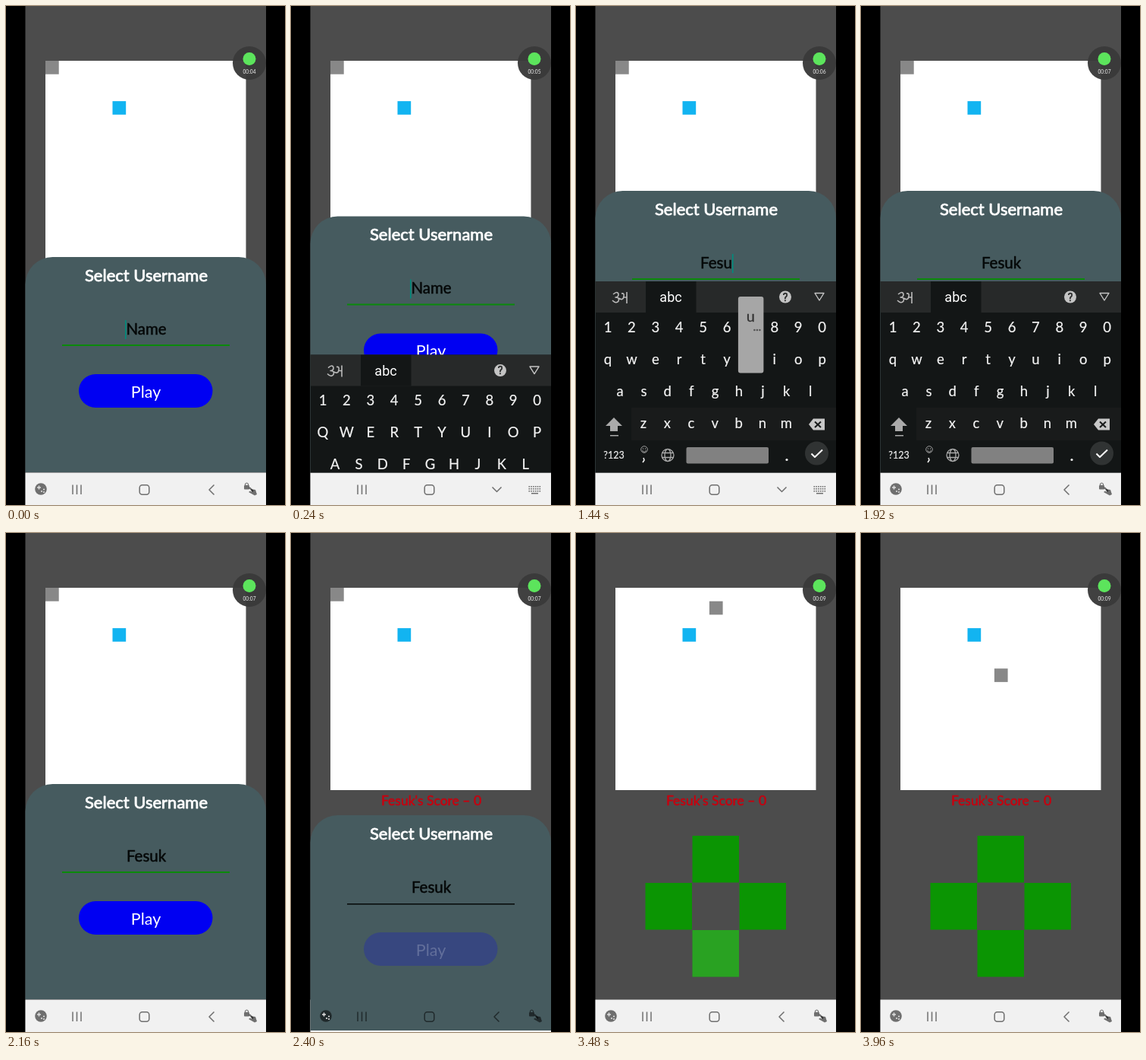
An HTML page with a canvas for the animation above (4080 ms loop, 368 px wide and 656 px high).

```html
<!DOCTYPE html>
<html lang="en">
<head>
<meta charset="utf-8">
<style>
html, body { margin: 0; width: 100%; height: 100%; overflow: hidden; background: #000; }
canvas { display: block; }
</style>
</head>
<body>
<canvas id="stage" width="368" height="656"></canvas>
<script>
const ctx = document.getElementById("stage").getContext("2d");
const LOOP = 4080, STEP = 120;
const CELL = 17.7, BOARD = { x: 52, y: 72, w: 264.5, h: 266 };
const PLAYER = "Fesuk";
const PRESSES = [800, 980, 1160, 1380, 1620];
const KEY_GAP = 31.4;
const ROWS = [
  { keys: "1234567890", x: 42, y: 422 },
  { keys: "qwertyuiop", x: 42, y: 464 },
  { keys: "asdfghjkl", x: 58, y: 506 },
  { keys: "zxcvbnm", x: 89, y: 548 }
];

const clamp = v => Math.max(0, Math.min(1, v));
const easeOut = v => 1 - (1 - clamp(v)) ** 3;

function rect(x, y, w, h, color) {
  ctx.fillStyle = color;
  ctx.fillRect(x, y, w, h);
}

function roundRect(x, y, w, h, r, color) {
  ctx.beginPath();
  ctx.roundRect(x, y, w, h, r);
  ctx.fillStyle = color;
  ctx.fill();
}

function circle(x, y, r, color) {
  ctx.beginPath();
  ctx.arc(x, y, r, 0, Math.PI * 2);
  ctx.fillStyle = color;
  ctx.fill();
}

function line(points, color, width = 1.5, close = false) {
  ctx.beginPath();
  points.forEach(([x, y], i) => i ? ctx.lineTo(x, y) : ctx.moveTo(x, y));
  if (close) ctx.closePath();
  ctx.strokeStyle = color;
  ctx.lineWidth = width;
  ctx.stroke();
}

function polygon(points, color) {
  ctx.beginPath();
  points.forEach(([x, y]) => ctx.lineTo(x, y));
  ctx.fillStyle = color;
  ctx.fill();
}

function strokePath(d, color, width) {
  ctx.strokeStyle = color;
  ctx.lineWidth = width;
  ctx.stroke(new Path2D(d));
}

function text(str, x, y, size, color, weight = 0, family = "Lato") {
  ctx.font = `${size}px ${family}, sans-serif`;
  ctx.textAlign = "center";
  ctx.fillStyle = color;
  ctx.fillText(str, x, y);
  if (weight) {
    ctx.strokeStyle = color;
    ctx.lineWidth = weight;
    ctx.strokeText(str, x, y);
  }
}

function snakeCell(t) {
  if (t <= 3120) return [Math.max(0, Math.min(5, Math.floor((t - 2400) / STEP))), 0];
  const moved = Math.floor((t - 3120) / STEP * 1.15);
  return [5 + Math.min(2, moved), Math.max(0, moved - 2)];
}

function drawCell(col, row, color) {
  rect(BOARD.x + col * CELL, BOARD.y + row * CELL, 17.7, 17.7, color);
}

function drawGame(t) {
  rect(0, 0, 368, 656, "#000");
  rect(25.5, 0, 317.5, 656, "#4c4c4c");
  rect(BOARD.x, BOARD.y, BOARD.w, BOARD.h, "#fff");
  drawCell(5, 3, "#12b4f1");
  drawCell(...snakeCell(t), "#888");
  text(`${PLAYER}'s Score – 0`, 185, 358, 17.5, "#c8000f", 0.5);
  for (const [x, y] of [[153, 398], [91, 460], [215, 460], [153, 522]])
    rect(x + 0.5, y, 61.5, 61.5, "#0b9503");
  if (t >= 3300 && t < 3500) rect(153.5, 522, 61.5, 61.5, "rgba(255,255,255,.12)");
}

function drawBubble(t) {
  circle(321, 75, 22, "rgba(58,58,58,.96)");
  circle(321, 69.5, 8.5, "#5ce45c");
  text("00:0" + (4 + Math.floor((t + 700) / 820)), 321, 88.5, 6.7, "#eee");
}

function drawPanel(t, lift, slide, typed) {
  const dy = slide - 87 * lift;
  roundRect(25.5, 330 + dy, 317.5, 283 + slide - dy, [36, 36, 0, 0], "#465b5f");
  text("Select Username", 185, 362 + dy, 22, "#fff", 0.8);

  const value = PLAYER.slice(0, typed);
  text(value || "Name", 185, 432 + dy, 20.5, "#050808", 0.5);
  if (t < 1800) {
    const half = ctx.measureText(value).width / 2;
    rect(typed ? 185 + half : 157, 413 + dy, 1.6, 25, "#008c7c");
  }
  if (t < 2200) rect(74, 445 + dy, 221, 2, "#0b8a0b");
  else rect(74, 446 + dy, 221, 1.6, "#080c0c");

  ctx.globalAlpha = t < 2280 ? 1 : t < 2400 ? 0.6 : 0.22;
  roundRect(96, 484 + dy, 176.5, 44, 22, "#0000f2");
  text("Play", 184.5, 515 + dy, 21.5, "#fff");
  ctx.globalAlpha = 1;
}

function drawToolbar() {
  rect(25.5, 362, 317.5, 41, "#272929");
  rect(92, 362, 66.5, 41, "#131616");
  strokePath("M49 379Q55 374 56 379Q56 383 52 383Q58 383 56 388Q53 392 48 387M56 384Q62 388 63 382Q64 377 60 378M63 383H67M67 376V391", "#bbb", 1.6);
  text("abc", 125, 389, 18, "#fff", 0, "Roboto");
  circle(276, 382.5, 8, "#c4c4c4");
  text("?", 276, 387.5, 14, "#272929", 0.6, "Roboto");
  line([[315, 377.5], [327, 377.5], [321, 387]], "#c4c4c4", 1.4, true);
}

function drawBottomKeys() {
  text("?123", 50, 595, 12.5, "#eee", 0.2);
  line([[89, 594], [90, 597], [88, 600]], "#eee", 1.6);
  ctx.beginPath();
  ctx.arc(90, 583, 4.3, 0, 7);
  ctx.moveTo(92.3, 584);
  ctx.arc(90, 584, 2.3, 0, Math.PI);
  ctx.strokeStyle = "#aaa";
  ctx.lineWidth = 0.9;
  ctx.stroke();
  circle(88.5, 582, 0.7, "#aaa");
  circle(91.5, 582, 0.7, "#aaa");

  ctx.beginPath();
  ctx.arc(121, 590.5, 8, 0, 7);
  ctx.moveTo(125, 590.5);
  ctx.ellipse(121, 590.5, 4, 8, 0, 0, 7);
  for (const y of [587.5, 593.5]) {
    ctx.moveTo(113.5, y);
    ctx.lineTo(128.5, y);
  }
  ctx.strokeStyle = "#aaa";
  ctx.lineWidth = 1.3;
  ctx.stroke();

  roundRect(145.5, 580, 108.5, 21.5, 2, "#818181");
  circle(278, 596.5, 1.6, "#eee");
  circle(317.5, 588, 15.5, "#303333");
  line([[310.5, 588.5], [315, 593], [325, 583.5]], "#fff", 2);
}

function drawPopup(letter, upper) {
  const row = ROWS.find(r => r.keys.includes(letter));
  const x = row.x + row.keys.indexOf(letter) * KEY_GAP;
  roundRect(x - 16.5, row.y - 82, 33.5, 100.5, 3, "#a6a6a6");
  text(upper ? letter.toUpperCase() : letter, x, row.y - 49, 20, "#333", 0.3);
  for (const dx of [5, 8.5, 12]) circle(x + dx, row.y - 38, 1.3, "#555");
}

function drawKeyboard(t, lift, typed) {
  if (lift <= 0) return;
  const upper = typed === 0;
  ctx.save();
  ctx.beginPath();
  ctx.rect(25.5, 0, 317.5, 613.5);
  ctx.clip();
  ctx.translate(0, 251 * (1 - lift));
  rect(25.5, 362, 317.5, 252, "#131616");
  rect(73, 528, 270, 43, "#191b1b");
  drawToolbar();
  for (const row of ROWS)
    [...row.keys].forEach((key, i) =>
      text(upper ? key.toUpperCase() : key, row.x + i * KEY_GAP, row.y + 6.5, 18.5, "#f4f4f4", 0.2));

  const shift = upper ? "#fff" : "#aaa";
  polygon([[50, 541], [61, 552], [55, 552], [55, 559], [45, 559], [45, 552], [39, 552]], shift);
  rect(45, 564, 11, 1.5, shift);
  polygon([[307, 550], [313, 542.5], [328, 542.5], [328, 557.5], [313, 557.5]], "#c8c8c8");
  line([[315, 546.5], [323, 554]], "#191b1b", 2);
  line([[323, 546.5], [315, 554]], "#191b1b", 2);
  drawBottomKeys();

  const pressed = PRESSES.findIndex(p => t >= p && t < p + 130);
  if (pressed >= 0) drawPopup(PLAYER[pressed].toLowerCase(), pressed === 0);
  ctx.restore();
}

function drawNavIcons(typing) {
  const ink = "rgba(0,0,0,.54)";
  for (const x of [88, 93.5, 99]) line([[x, 629.5], [x, 642]], ink, 1.5);
  ctx.beginPath();
  ctx.roundRect(176.2, 629.7, 12.6, 12.6, 3.5);
  ctx.strokeStyle = ink;
  ctx.lineWidth = 1.5;
  ctx.stroke();

  if (typing) {
    line([[265.5, 632.5], [271.5, 638.5], [277.5, 632.5]], ink);
    for (let row = 0; row < 3; row++)
      for (let col = 0; col < 6; col++)
        rect(313.5 + col * 2.8, 631 + row * 3, 1.6, 1.6, ink);
    rect(317, 640, 9, 1.5, ink);
    return;
  }
  line([[274.5, 629.5], [268, 636], [274.5, 642.5]], ink);
  circle(46, 635, 7.8, ink);
  line([[41, 633], [46, 633]], "#ddd", 1.5);
  line([[43.5, 630.5], [43.5, 635.5]], "#ddd", 1.5);
  for (const [x, y] of [[47, 638], [50, 635.5], [50, 639]]) circle(x, y, 1.1, "#ddd");

  roundRect(314, 630, 7, 5.5, 1, ink);
  strokePath("M315.5 630V628.5Q317.5 625.5 319.5 628.5V630", ink, 1.2);
  strokePath("M321 633L326 638", ink, 2.2);
  polygon([[320, 639], [322, 637.5], [324, 639], [323, 635], [329, 636], [331, 642], [328, 643.5]], ink);
}

function draw(t) {
  const lift = t < 1920 ? easeOut((t - 150) / 330) : 1 - easeOut((t - 1920) / 220);
  const slide = t < 2330 ? 0 : t <= 2400 ? 41 : 41 + 330 * easeOut((t - 2400) / 300);
  const typed = PRESSES.filter(p => t >= p).length;
  const typing = t >= 240 && t < 1850;

  drawGame(t);
  rect(25.5, 613.5, 317.5, 42.5, "#f1f1f1");
  if (t < 2760) drawPanel(t, lift, slide, typed);
  drawKeyboard(t, lift, typed);
  drawNavIcons(typing);
  drawBubble(t);
}

ctx.lineJoin = "round";
const start = performance.now();
function tick() {
  const t = (performance.now() - start) % LOOP;
  draw(Math.floor(t / STEP) * STEP);
  requestAnimationFrame(tick);
}
tick();
</script>
</body>
</html>
```
